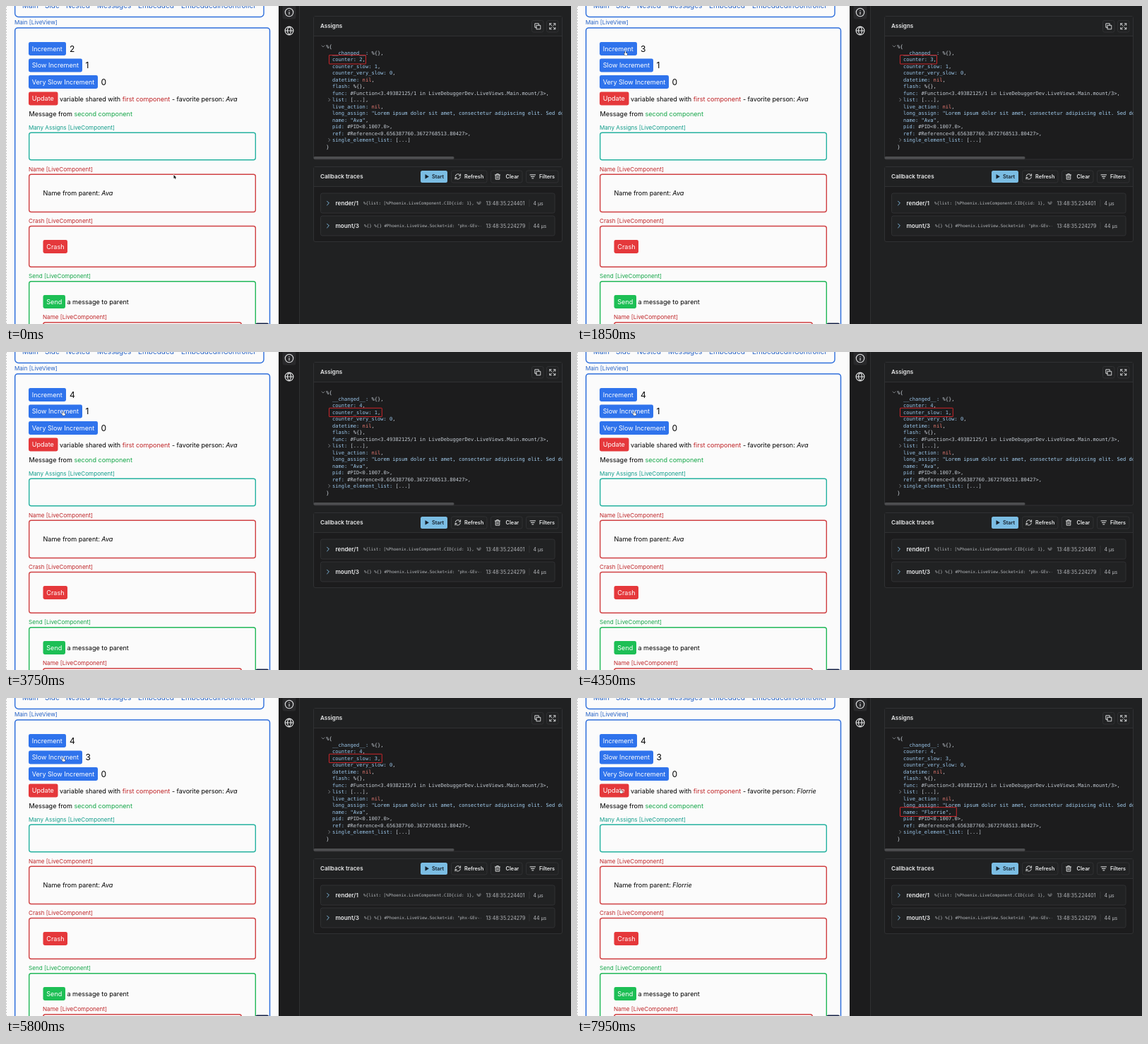
An HTML page with a canvas for the animation above (8 s loop, 800 px wide and 450 px high).

```html
<!DOCTYPE html>
<html lang="en">
<head>
<meta charset="utf-8">
<title>Live assigns</title>
<style>
html, body { margin: 0; width: 100%; height: 100%; overflow: hidden; background: #202122; }
canvas { display: block; width: 800px; height: 450px; }
</style>
</head>
<body>
<canvas id="stage"></canvas>
<script>
const LOOP = 8000;
const SANS = 'Inter, sans-serif';
const MONO = '"DejaVu Sans Mono", monospace';
const BLUE = '#2f73ec', RED = '#e5383b', GREEN = '#1dbf55';
const LINE_BLUE = '#2f6fdc', LINE_RED = '#d04143', LINE_TEAL = '#25b2a0', LINE_GREEN = '#21b858';
const TEXT_BLUE = '#2360c4', TEXT_RED = '#bf2427', TEXT_TEAL = '#109c8a', TEXT_GREEN = '#14a648';
const INK = '#000', LIGHT = '#e6e7e8';
const BODY = '#202122', PANEL = '#1c1c1d', RAISED = '#212223', EDGE = '#303133';

const canvas = document.getElementById('stage');
const dpr = window.devicePixelRatio || 1;
canvas.width = 800 * dpr;
canvas.height = 450 * dpr;
const ctx = canvas.getContext('2d');

// Text whose capitals are centred on y; returns the x where it ends.
function text(str, x, y, size, color, { weight = 400, italic = false, family = SANS } = {}) {
  ctx.font = `${italic ? 'italic ' : ''}${weight} ${size}px ${family}`;
  ctx.fillStyle = color;
  ctx.fillText(str, x, y + size * 0.36);
  return x + ctx.measureText(str).width;
}

// A line of text made of [string, color, style] runs.
function runs(parts, x, y, size) {
  for (const [str, color, style] of parts) x = text(str, x, y, size, color, style);
}

function box(x1, y1, x2, y2, r, fill, stroke, width = 1) {
  ctx.beginPath();
  ctx.roundRect(x1, y1, x2 - x1, y2 - y1, r);
  if (fill) { ctx.fillStyle = fill; ctx.fill(); }
  if (stroke) { ctx.strokeStyle = stroke; ctx.lineWidth = width; ctx.stroke(); }
}

function rect(x, y, w, h, color) {
  ctx.fillStyle = color;
  ctx.fillRect(x, y, w, h);
}

function path(d, x, y, stroke, width = 1, fill) {
  ctx.save();
  ctx.translate(x, y);
  const p = new Path2D(d);
  ctx.lineWidth = width;
  ctx.lineCap = ctx.lineJoin = 'round';
  if (stroke) { ctx.strokeStyle = stroke; ctx.stroke(p); }
  if (fill) { ctx.fillStyle = fill; ctx.fill(p); }
  ctx.restore();
}

function clipped(x, y, w, h, draw) {
  ctx.save();
  ctx.beginPath();
  ctx.rect(x, y, w, h);
  ctx.clip();
  draw();
  ctx.restore();
}

// Latest value of a [time, value] list at time t.
const at = (steps, t) => steps.reduce((v, [start, value]) => t >= start ? value : v, steps[0][1]);

const COUNTER = [[0, 2], [1500, 3], [2500, 4]];
const SLOW = [[0, 1], [4650, 2], [5600, 3]];
const PERSON = [[0, 'Ava'], [7250, 'Florrie']];
const MARK = [[0, [457.5, 69.5, 509.5, 82]], [3350, [457.5, 79.3, 532.3, 91.5]], [6150, [457.5, 154.7, 537.3, 167.5]]];
const MOVES = [
  { start: 250, end: 1150, from: [237.5, 239], to: [68.5, 64] },
  { start: 3150, end: 3600, from: [68.5, 64], to: [81, 84] },
  { start: 5850, end: 6350, from: [81, 84], to: [62, 129] }
];

function pointer(t) {
  let pos = MOVES[0].from;
  for (const { start, end, from, to } of MOVES) {
    if (t < start) break;
    const k = Math.min(1, (t - start) / (end - start));
    const e = k * k * (3 - 2 * k);
    pos = from.map((v, i) => v + (to[i] - v) * e);
  }
  return pos;
}

const BUTTONS = [
  ['Increment', 32, 51, 85, BLUE],
  ['Slow Increment', 32, 74.5, 108, BLUE],
  ['Very Slow Increment', 32, 98, 130, BLUE],
  ['Update', 32, 121.5, 73.5, RED],
  ['Crash', 52.5, 331, 87, RED],
  ['Send', 52.5, 409, 84, GREEN]
];

const NAV = [['Main', 23], ['Side', 55], ['Nested', 85], ['Messages', 129], ['Embedded', 187], ['EmbeddedInController', 248]];

function component(label, x, y, x2, bottom, color, line) {
  text(label + ' [LiveComponent]', x, y, 8.1, color);
  box(x + 0.7, y + 7.5, x2, bottom, 3, null, line, 1.4);
}

function drawPage(s) {
  const body = 9.05;
  const italic = { italic: true };
  rect(0, 0, 386, 450, '#fbfbfb');
  for (let y = 0; y < 450; y += 4) rect(0, y, 0.8, 2, '#bbb');

  box(12.7, -20, 365, 15.5, 5, null, LINE_BLUE, 1.4);
  NAV.forEach(([label, x]) => text(label, x, -1.1, 10, TEXT_BLUE));

  text('Main [LiveView]', 12, 23.5, 8.1, TEXT_BLUE);
  box(12.7, 30.9, 373.5, 480, 4, null, LINE_BLUE, 1.5);

  for (const [label, x, y, x2, color] of BUTTONS) {
    box(x, y, x2, y + 19, 2.4, color);
    text(label, x + 4.8, y + 9.6, body, '#fff');
  }
  text(s.counter, 90, 60.3, 12, INK);
  text(s.slow, 112.5, 84, 12, INK);
  text('0', 134.5, 107.5, 12, INK);

  runs([
    ['variable shared with ', INK], ['first component', TEXT_RED],
    [' - favorite person: ', INK], [s.person, INK, italic]
  ], 76, 131.3, body);
  runs([['Message from ', INK], ['second component', TEXT_GREEN]], 32.5, 152.7, body);

  component('Many Assigns', 32, 171.7, 353.3, 217.7, TEXT_TEAL, LINE_TEAL);
  component('Name', 32, 230.7, 353.3, 291.5, TEXT_RED, LINE_RED);
  runs([['Name from parent: ', INK], [s.person, INK, italic]], 52.5, 265, body);
  component('Crash', 32, 304, 353.3, 369.3, TEXT_RED, LINE_RED);
  component('Send', 32, 382.3, 353.3, 480, TEXT_GREEN, LINE_GREEN);
  text('a message to parent', 86.5, 418.8, body, INK);
  component('Name', 52, 440.3, 333.3, 480, TEXT_RED, LINE_RED);
  box(353.5, 448.5, 372, 460, 2, '#182448');
}

function drawSidebar() {
  rect(386, 0, 29.5, 450, PANEL);
  rect(415, 0, 1, 450, EDGE);
  box(391.5, -4, 410.5, 18.5, 3, '#29292b');
  path('M-5.7 0a5.7 5.7 0 1 0 11.4 0a5.7 5.7 0 1 0-11.4 0M0-.4V2.8M0-2.7V-2.6', 401, 9, LIGHT, 1.1);
  path('M-5.9 0a5.9 5.9 0 1 0 11.8 0a5.9 5.9 0 1 0-11.8 0H5.9M0-5.9C-3.4-2.5-3.4 2.5 0 5.9C3.4 2.5 3.4-2.5 0-5.9', 401, 35, LIGHT, 1.1);
}

const KEY = '#9ac6ea', PLAIN = '#c4cbd3', STRING = '#a5d0f2', NIL = '#ef7d75', FAINT = '#8f9499';

function valueColor(value) {
  if (value === 'nil') return NIL;
  if (value.startsWith('"')) return STRING;
  return /^\d/.test(value) ? KEY : PLAIN;
}

function drawCode(s) {
  const rows = [
    ['__changed__', '%{}'], ['counter', `${s.counter}`], ['counter_slow', `${s.slow}`],
    ['counter_very_slow', '0'], ['datetime', 'nil'], ['flash', '%{}'],
    ['func', '#Function<3.49382125/1 in LiveDebuggerDev.LiveViews.Main.mount/3>'],
    ['list', '[...]'], ['live_action', 'nil'],
    ['long_assign', '"Lorem ipsum dolor sit amet, consectetur adipiscing elit. Sed do eiusmod"'],
    ['name', `"${s.person}"`], ['pid', '#PID<0.1007.0>'],
    ['ref', '#Reference<0.656387760.3672768513.80427>'], ['single_element_list', '[...]']
  ];
  const size = 7.08, top = 57, pitch = 9.47;
  const mono = { family: MONO };
  text('%{', 453.3, top, size, PLAIN, mono);
  path('M-2-1L0 1L2-1', 449, top, FAINT, 0.8);
  rows.forEach(([key, value], i) => {
    const y = top + pitch * (i + 1);
    const comma = i < rows.length - 1 ? ',' : '';
    runs([[key + ': ', KEY, mono], [value, valueColor(value), mono], [comma, PLAIN, mono]], 462, y, size);
    if (value === '[...]') path('M-1-2L1 0L-1 2', 457.8, y, FAINT, 0.8);
  });
  text('}', 453.3, top + pitch * 15, size, PLAIN, mono);
}

function panel(title, top, bottom, split) {
  box(435.5, top, 787.5, bottom, 2.5, PANEL, EDGE);
  rect(436, top + 0.5, 351, split - top - 0.5, BODY);
  rect(436, split, 351, 1, EDGE);
  text(title, 445, (top + split) / 2 + 0.1, 8.1, LIGHT, { weight: 600 });
}

function drawAssigns(s) {
  panel('Assigns', 14.5, 217, 42);
  box(744.5, 20.5, 761, 37, 2.5, RAISED, EDGE);
  box(765.5, 20.5, 782, 37, 2.5, RAISED, EDGE);
  path('M-1.5-1.5H4V4H-1.5ZM-1.5 1.5H-4V-4H1.5V-1.5', 752.8, 28.8, LIGHT, 0.9);
  path('M1.5-4H4V-1.5M4-4L1-1M-1.5-4H-4V-1.5M-4-4L-1-1M1.5 4H4V1.5M4 4L1 1M-1.5 4H-4V1.5M-4 4L-1 1', 773.8, 28.8, LIGHT, 0.9);
  clipped(436, 43, 351.5, 170, () => drawCode(s));
  box(435.5, 213, 634.5, 216.7, 1.8, '#4d4e50');
}

function trace(y, name, args, argsX, stamp, cost) {
  box(445.5, y - 14, 777, y + 14, 2.5, RAISED, EDGE);
  path('M-1.4-2.8L1.4 0L-1.4 2.8', 456, y, '#7fb9df', 1);
  text(name, 466.5, y, 8.2, LIGHT, { weight: 600 });
  clipped(500, y - 10, 172.5, 20, () => text(args, argsX, y + 0.3, 5.93, '#b3b6ba', { family: MONO }));
  text(stamp, 679.5, y, 7, '#b5b7bb');
  rect(740.5, y - 5, 1, 10, EDGE);
  text(cost, 746.5, y, 7, '#b5b7bb');
}

function toolButton(label, x1, x2, textX) {
  box(x1, 233, x2, 250, 2.5, RAISED, EDGE);
  text(label, textX, 241.5, 7.3, LIGHT, { weight: 600 });
}

function drawTraces() {
  panel('Callback traces', 227.5, 333.5, 255);

  box(587, 233, 625, 250, 2.5, '#7bbde3');
  path('M-2-2.6L2.4 0L-2 2.6Z', 596, 241.4, '#15202b', 0.6, '#15202b');
  text('Start', 603, 241.5, 7.3, '#15202b', { weight: 600 });
  toolButton('Refresh', 630.5, 681, 649);
  path('M-3.6-.6A3.7 3.7 0 0 1 3-2.2L3.6-1.5M3.8-3.6V-1.3H1.5M3.6.6A3.7 3.7 0 0 1-3 2.2L-3.6 1.5M-3.8 3.6V1.3H-1.5', 639.8, 241.4, LIGHT, 0.9);
  toolButton('Clear', 686.5, 731, 707.5);
  path('M-3.6-2.4H3.6M-1.3-2.4V-3.8H1.3V-2.4M-2.8-2.4V3.8H2.8V-2.4M-.9-.5V2M.9-.5V2', 696, 241.4, LIGHT, 0.9);
  toolButton('Filters', 736.5, 782, 755);
  path('M-3.8-2.5H3.8M-2.4 0H2.4M-1 2.5H1', 745.8, 241.4, LIGHT, 1);

  trace(279, 'render/1', '%{list: [%Phoenix.LiveComponent.CID{cid: 1}, %Phoenix', 506, '13:48:35.224401', '4 µs');
  trace(311, 'mount/3', '%{} %{} #Phoenix.LiveView.Socket<id: "phx-GEv--', 507, '13:48:35.224279', '44 µs');
}

const HAND = 'M-.6 .5Q0-.3 .6 .5V2.4L2.4 2.9Q3 3.2 2.8 4.1L2.3 5.7H-.5L-2.1 3.6Q-2.1 2.7-1.3 3.1L-.6 3.7Z';
const ARROW = 'M0 0V5.2L1.2 4.1L2.1 6L3 5.6L2.2 3.8H3.7Z';

function drawPointer([x, y]) {
  const over = BUTTONS.some(([, x1, y1, x2]) => x > x1 && x < x2 && y > y1 && y < y1 + 19);
  if (over) path(HAND, x, y, '#222', 0.9, '#fff');
  else path(ARROW, x, y, '#fff', 1, '#111');
}

function draw(t) {
  const state = { counter: at(COUNTER, t), slow: at(SLOW, t), person: at(PERSON, t) };
  ctx.setTransform(dpr, 0, 0, dpr, 0, 0);
  rect(0, 0, 800, 450, BODY);
  drawPage(state);
  drawSidebar();
  drawAssigns(state);
  drawTraces();
  box(...at(MARK, t), 0.5, null, '#c9262b', 1);
  drawPointer(pointer(t));
}

const begin = performance.now();
function tick() {
  draw((performance.now() - begin) % LOOP);
  requestAnimationFrame(tick);
}
tick();
</script>
</body>
</html>
```
